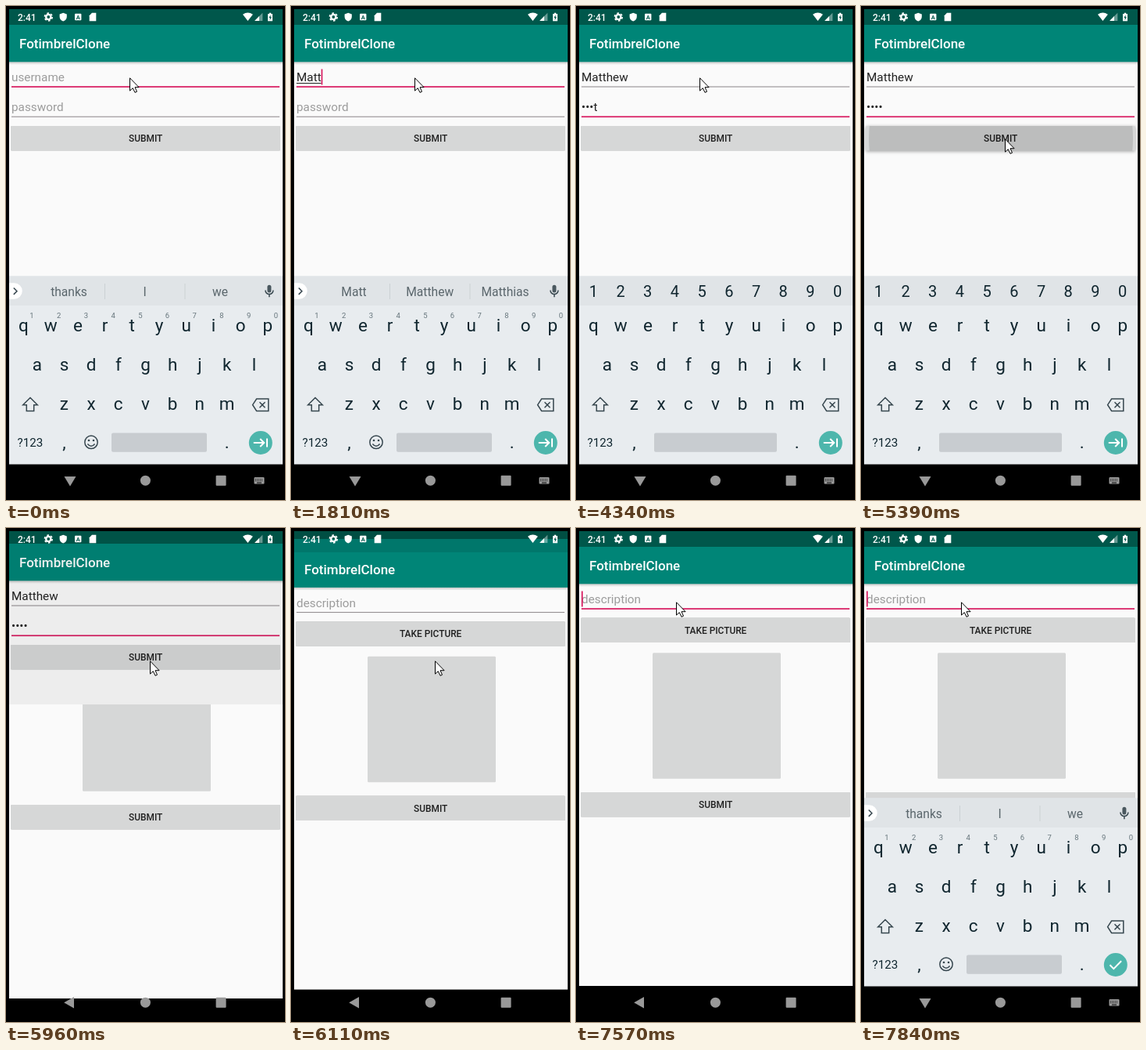
An HTML page that plays this animation: 357 by 630 pixels, repeating every 7990 ms.

```html
<!DOCTYPE html>
<html lang="en">
<head>
<meta charset="utf-8">
<title>Login demo</title>
<style>
  html, body { margin: 0; width: 100%; height: 100%; overflow: hidden; background: #000; }
  svg { display: block; width: 357px; height: 630px; font-family: Roboto, sans-serif; }
  text { white-space: pre; }
  .title { font-size: 17px; font-weight: 500; fill: #fff; }
  .field { font-size: 15.3px; fill: #222; }
  .hint { font-size: 15.3px; fill: #9c9c9c; }
  .label { font-size: 11.9px; font-weight: 500; fill: #202020; text-anchor: middle; }
  .button { fill: #d6d7d7; filter: drop-shadow(0 .8px .6px rgba(0, 0, 0, .25)); }
  .button.pressed { filter: drop-shadow(0 1.5px 2px rgba(0, 0, 0, .35)); }
  .key { font-size: 22.5px; fill: #10262f; text-anchor: middle; }
  .digit { font-size: 20px; fill: #10262f; text-anchor: middle; }
  .mini { font-size: 9.5px; fill: #66757c; text-anchor: middle; }
  .word { font-size: 15.6px; fill: #5a666c; text-anchor: middle; }
  .line { fill: none; stroke: #37474f; stroke-width: 1.5; }
  .accent { fill: #d81b60; }
</style>
</head>
<body>
<svg id="stage" viewBox="0 0 357 630"></svg>
<script>
const LOOP = 7990;
const ROW_STEP = 34.7;
const APP_NAME = 'FotimbrelClone';

const rect = (x, y, w, h, fill, extra = '') =>
  `<rect x="${x}" y="${y}" width="${w}" height="${h}" fill="${fill}" ${extra}/>`;
const text = (x, y, cls, str, extra = '') =>
  `<text x="${x}" y="${y}" class="${cls}" ${extra}>${str}</text>`;
const keyRow = (letters, x, y, cls) =>
  [...letters].map((c, i) => text(x + i * ROW_STEP, y, cls, c)).join('');

const button = (y, label, id = '') =>
  `<rect ${id && `id="${id}"`} class="button" x="6" y="${y}" width="345" height="31.5" rx="1.5"/>` +
  text(178.7, y + 20.2, 'label', label);

const input = (id, y, hint) => `
  <g id="${id}">
    ${text(7, y + 5.2, 'hint', hint)}
    ${text(7, y + 5.2, 'field', '')}
    <rect class="compose" x="7" y="${y + 7}" height="1" fill="#222"/>
    <rect class="rule" x="7" width="343"/>
    <rect class="caret accent" y="${y - 10.5}" width="1.7" height="20"/>
  </g>`;

const appWindow = body => `
  ${rect(4, 4, 350, 20, '#00574b')}
  ${rect(4, 24, 350, 560, '#fafafa')}
  ${rect(4, 71, 350, 4, 'url(#barShade)')}
  ${rect(4, 24, 350, 47.3, '#008577')}
  ${text(17, 54.2, 'title', APP_NAME)}
  ${body}`;

const statusIcons = `
  <g fill="#fff">
    ${text(15, 18.6, '', '2:41', 'font-size="12" font-weight="500"')}
    <g fill="none" stroke="#fff">
      <circle cx="54.3" cy="14" r="3.1" stroke-width="2.4"/>
      <circle cx="54.3" cy="14" r="4.9" stroke-width="1.6" stroke-dasharray="2.6 2.53"/>
    </g>
    <path d="M73.2 8.8l4.6 1.8v3.2q0 4-4.6 5.7q-4.6-1.7-4.6-5.7v-3.2z"/>
    ${rect(88, 9.8, 8.4, 8.4, '#fff', 'rx="1"')}
    ${text(92.2, 16.8, '', 'A', 'font-size="7.5" font-weight="700" fill="#00574b" text-anchor="middle"')}
    <path d="M110 8.8h5.3v10.4h-8.6v-7z"/>
    <path d="M303 10.8q6.4-4.6 12.9 0L309.4 19z"/>
    <path d="M328.3 8.8v10.2h-10.2z" opacity=".4"/>
    <path d="M324 13.1v5.9h-5.9z"/>
    <path d="M335 10h1.8v-1.3h2.4v1.3h1.8v9.2h-6z"/>
    <path d="M338.6 11.5l-2.2 3.6h1.3v2.8l2.2-3.7h-1.3z" fill="#00574b"/>
  </g>`;

const keyboard = `
  ${rect(4, 344.5, 350, 240, '#e8ecef')}
  ${rect(4, 344.5, 350, 37.5, '#e0e4e7')}
  <g id="wordStrip">
    <path d="M4 353.2h6.5a10.3 10.3 0 0 1 0 20.6h-6.5z" fill="#fff"/>
    <path class="line" d="M9.8 359.5l4.2 4.2-4.2 4.2"/>
    ${[126, 228.5].map(x => rect(x, 354, 1, 20, '#cbd1d4')).join('')}
    ${[80.5, 177.7, 274].map(x => text(x, 369.6, 'word', '')).join('')}
    ${rect(334.4, 355.8, 5, 9.6, '#4a585f', 'rx="2.5"')}
    <path class="line" d="M331.9 362.6a5 5 0 0 0 10 0M336.9 367.6v3.6"/>
    ${keyRow('1234567890', 33, 398, 'mini')}
    <g class="line" stroke-width="1.3">
      <circle cx="109" cy="556.3" r="8.2"/>
      <path d="M104.4 558.4q4.6 5.6 9.2 0"/>
    </g>
    <circle cx="106" cy="554" r="1.3" fill="#37474f"/>
    <circle cx="112" cy="554" r="1.3" fill="#37474f"/>
  </g>
  <g id="digitStrip">${keyRow('1234567890', 22.3, 371.4, 'digit')}</g>
  ${keyRow('qwertyuiop', 22.5, 414.5, 'key')}
  ${keyRow('asdfghjkl', 39.8, 464.6, 'key')}
  ${keyRow('zxcvbnm', 74.3, 514.8, 'key')}
  <path class="line" d="M31 499.5l9.3 9.3h-4.6v7.7h-9.4v-7.7h-4.6z"/>
  <path class="line" d="M320.6 501h15.2v15.4h-15.2l-5-7.7zM324.5 505.2l7 7m0-7l-7 7"/>
  ${text(31, 562, 'key', '?123', 'style="font-size:15.2px"')}
  ${text(74.5, 563.5, 'key', ',')}
  ${text(282.7, 564, 'key', '.')}
  <rect id="space" y="544.6" height="24.2" rx="2" fill="#c8ccd0"/>
  <circle cx="325.8" cy="557" r="15" fill="#4db6ac"/>
  <path id="enter" fill="none" stroke="#fff" stroke-width="2"/>`;

document.getElementById('stage').innerHTML = `
  <defs>
    <linearGradient id="barShade" x2="0" y2="1">
      <stop stop-color="#000" stop-opacity=".22"/><stop offset="1" stop-color="#000" stop-opacity="0"/>
    </linearGradient>
    <clipPath id="screen">${rect(4, 4, 350, 622, '#000')}</clipPath>
    <clipPath id="reveal"><rect id="revealBox" x="4" width="350"/></clipPath>
    <clipPath id="buttonArea">${rect(6, 153, 345, 31.5, '#000')}</clipPath>
  </defs>
  ${rect(0, 0, 357, 630, '#000')}
  <g clip-path="url(#screen)">
    <g id="login">${appWindow(
      input('user', 91, 'username') + input('pass', 129.2, 'password') +
      button(153, 'SUBMIT', 'submit') +
      '<circle id="ripple" cy="169" opacity=".12" clip-path="url(#buttonArea)"/>')}
    </g>
    <rect id="dim" x="4" y="4" width="350" height="622"/>
    <g clip-path="url(#reveal)">
      <g id="post">${appWindow(
        input('desc', 91, 'description') + button(114.6, 'TAKE PICTURE') +
        rect(98, 159.2, 164, 160.5, '#d6d7d7', 'rx="1.5"') + button(337, 'SUBMIT'))}
      </g>
    </g>
    <g id="keyboard">${keyboard}</g>
  </g>
  ${statusIcons}
  <g fill="#999">
    <path id="back"/>
    <circle cx="178.4" cy="605.2" r="6.5"/>
    ${rect(268.6, 598.8, 13, 13, '#999', 'rx="1"')}
    <g id="imeIcon">
      ${rect(317.5, 601, 13, 8.6, '#999', 'rx="1"')}
      <path d="M319 603.5h10M319 605.5h10" stroke="#000" stroke-dasharray="1 1"/>
      <path d="M321 608h6" stroke="#000"/>
    </g>
  </g>
  <path id="pointer" d="M0 .3V16.6L3.8 13.2 6.5 18.8 9 17.7 6.5 12.2H11.6Z" fill="#fff" stroke="#000"/>`;

const $ = id => document.getElementById(id);
const show = (node, on) => node.setAttribute('visibility', on ? 'inherit' : 'hidden');
const set = (node, attrs) => { for (const k in attrs) node.setAttribute(k, attrs[k]); };
const shift = (node, x, y) => node.setAttribute('transform', `translate(${x} ${y})`);

// Each row holds a start time followed by the values that last until the next row.
const at = (table, t) => table.findLast(row => row[0] <= t).slice(1);

const USER = [[0, ''], [1140, 'M'], [1410, 'Ma'], [1560, 'Mat'], [1810, 'Matt'],
  [1960, 'Matth'], [2080, 'Matthe'], [2230, 'Matthew']];
const PASS = [[0, ''], [3360, 't'], [3510, '•e'], [3660, '••s'], [3810, '•••t'], [5390, '••••']];
const WORDS = [[0, 'thanks', 'I', 'we'], [1140, 'M', 'My', 'Maybe'], [1410, 'Ma', 'May', 'Make'],
  [1560, 'Mat', 'Matthew', 'Matthias'], [1810, 'Matt', 'Matthew', 'Matthias'],
  [1960, 'Matth', 'Matthew', 'Matthews'], [2080, 'Matthe', 'Matthew', 'Matthew\'s'],
  [2230, 'Matthew', 'Matthew\'s', 'Matthews'], [6000, 'thanks', 'I', 'we']];
const FOCUS = [[0, 'user'], [2530, 'pass'], [6110, ''], [7450, 'desc']];
const CARET = [[0, false], [460, true], [990, false], [1140, true], [3050, false], [3360, true],
  [4340, false], [4900, true], [5390, false], [7570, true]];
const POINTER = [[0, 158.5, 91.5], [4900, 174, 138], [5020, 184.5, 169.5], [6910, 183.8, 169.5],
  [7060, 170, 150], [7180, 146, 117], [7300, 128, 94], [7450, 128.5, 94.5]];
const RIPPLE = [[0, 0, 0], [5270, 182, 90], [5390, 179, 169], [5690, 0, 0]];
// login offset, dim, post offset, top of the revealed area
const SWITCH = [[0, 0, 0, 25, 630], [5840, -.5, .01, 24, 575], [5960, -4, .05, 16, 225],
  [6110, -10, .1, 4.6, 31], [6230, 0, 0, 0, 4]];
// keyboard opacity and offset
const KEYS = [[0, 1, 0], [5840, .6, 8], [5960, 0, 0], [7720, .7, 10], [7840, 1, 0]];

function drawInput(id, value, focus, caretOn, composing) {
  const [hint, field, compose, rule, caret] = $(id).children;
  const focused = focus === id;
  const lineY = { user: 103, pass: 141.2, desc: 103 }[id];
  if (field.textContent !== value) field.textContent = value;
  const width = value ? field.getComputedTextLength() : 0;
  show(hint, !value);
  show(compose, composing);
  set(compose, { width });
  set(rule, focused
    ? { y: lineY - .8, height: 1.7, fill: '#d81b60' }
    : { y: lineY - .5, height: 1, fill: '#8c8589' });
  show(caret, focused && caretOn);
  set(caret, { x: 7 + width });
}

function draw(t) {
  const [focus] = at(FOCUS, t), [caretOn] = at(CARET, t);
  const [user] = at(USER, t), [pass] = at(PASS, t);
  drawInput('user', user, focus, caretOn, focus === 'user' && user !== '');
  drawInput('pass', pass, focus, caretOn, false);
  drawInput('desc', '', focus, caretOn, false);

  const [cx, r] = at(RIPPLE, t);
  set($('ripple'), { cx, r });
  $('submit').classList.toggle('pressed', r > 0);

  const [loginY, dim, postY, top] = at(SWITCH, t);
  shift($('login'), 0, loginY);
  shift($('post'), 0, postY);
  set($('dim'), { opacity: dim });
  set($('revealBox'), { y: top, height: Math.max(0, 626 - top) });

  const [opacity, keysY] = at(KEYS, t);
  set($('keyboard'), { opacity });
  shift($('keyboard'), 0, keysY);
  const digits = t >= 2650 && t < 6000;
  show($('wordStrip'), !digits);
  show($('digitStrip'), digits);
  const spaceX = digits ? 100 : 135;
  set($('space'), { x: spaceX, width: 257 - spaceX });
  set($('enter'), { d: t > 7000
    ? 'M318.5 557.3l4.8 4.8 9.8-9.8'
    : 'M316.8 557h13.4M325.2 552l5 5-5 5M334 551.5v11' });
  const words = at(WORDS, t);
  $('wordStrip').querySelectorAll('.word').forEach((node, i) => {
    if (node.textContent !== words[i]) node.textContent = words[i];
  });

  const typing = t < 5840 || t >= 7720;
  set($('back'), { d: typing ? 'M74.5 600h15l-7.5 12.6z' : 'M87 598v14.6l-12.8-7.3z' });
  show($('imeIcon'), typing);
  shift($('pointer'), ...at(POINTER, t));
}

const start = performance.now();
function tick() {
  draw((performance.now() - start) % LOOP);
  requestAnimationFrame(tick);
}
tick();
</script>
</body>
</html>
```
